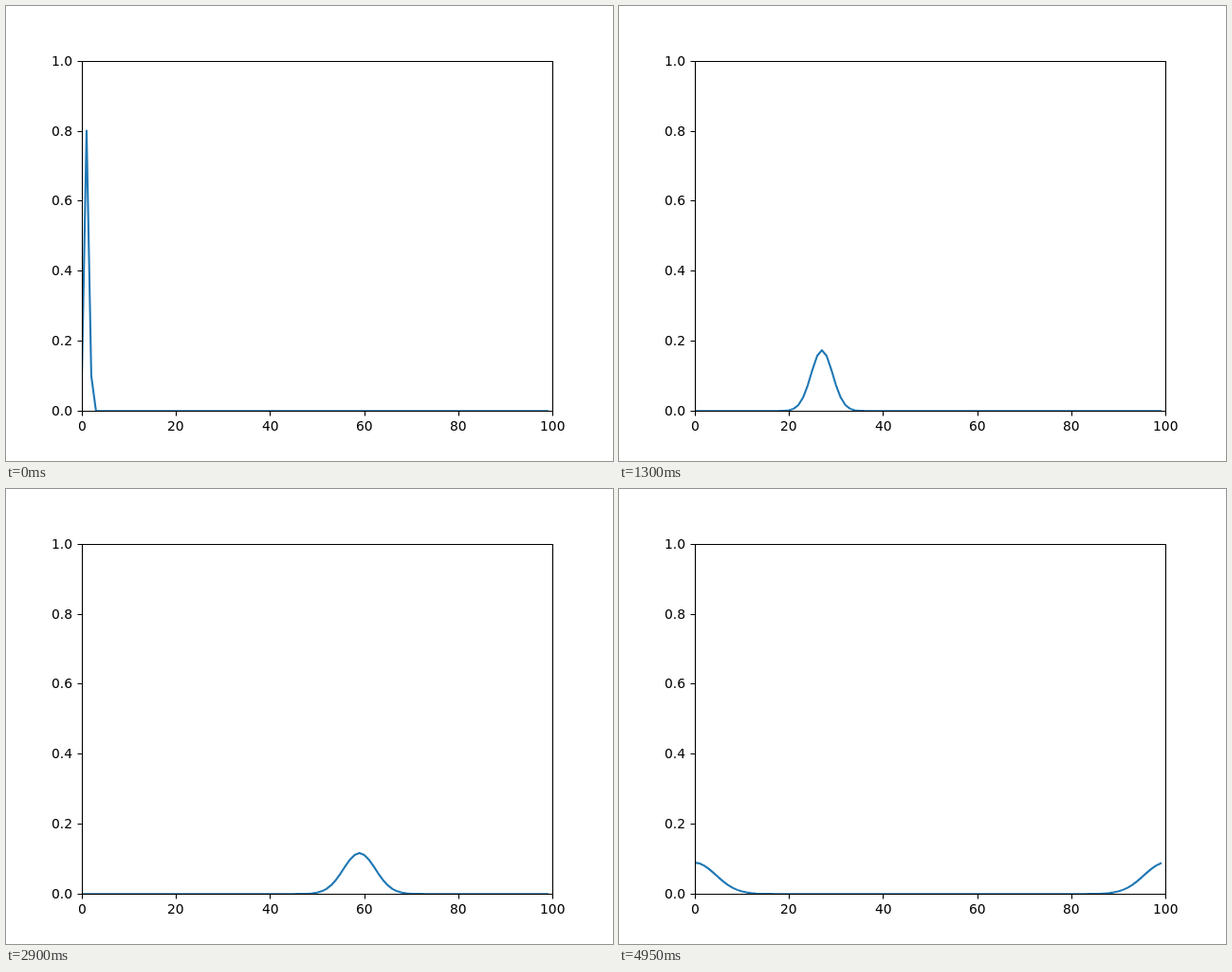
An HTML page for the animation above (5000 ms loop, 640 px wide and 480 px high).

```html
<!DOCTYPE html>
<html lang="en">
<head>
<meta charset="utf-8">
<title>Drifting pulse</title>
<style>
html, body { margin: 0; width: 100%; height: 100%; overflow: hidden; background: #fff; }
svg { display: block; width: 640px; height: 480px; }
text { font: 13.889px "DejaVu Sans", sans-serif; fill: #000; }
#curve { fill: none; stroke: #1f77b4; stroke-width: 2.083; stroke-linejoin: round; stroke-linecap: square; }
#axes { fill: none; stroke: #000; stroke-width: 1.111; }
</style>
</head>
<body>
<svg viewBox="0 0 640 480">
  <clipPath id="plot"><rect x="80" y="58" width="496" height="370"/></clipPath>
  <g clip-path="url(#plot)"><path id="curve"/></g>
  <path id="axes"/>
  <g id="labels"></g>
</svg>
<script>
const CELLS = 100, STEP = 50, LOOP = 5000;
const LEFT = 80, WIDTH = 496, BOTTOM = 427.2, HEIGHT = 369.6;
const curve = document.getElementById("curve");
const px = x => LEFT + WIDTH * x / 100;
const py = y => BOTTOM - HEIGHT * y;
const snap = v => Math.floor(v + 0.5) + 0.5;

function label(text, x, y) {
  const el = document.createElementNS("http://www.w3.org/2000/svg", "text");
  el.setAttribute("x", x);
  el.setAttribute("y", y);
  el.textContent = text;
  document.getElementById("labels").append(el);
}

function drawAxes() {
  let d = "M80.5 58.5H576.5V427.5H80.5Z";
  for (let i = 0; i <= 5; i++) {
    const x = px(20 * i), y = py(i / 5), name = String(20 * i);
    d += `M${snap(x)} 427.5v5M75.5 ${snap(y)}h5`;
    label(name, Math.round(x - name.length * 4.42), 448);
    label((i / 5).toFixed(1), 48, snap(y) + 4.5);
  }
  document.getElementById("axes").setAttribute("d", d);
}

// Move one cell right, with a 10% chance of falling short or overshooting.
function advance(p) {
  const at = i => p[(i + CELLS) % CELLS];
  return p.map((_, i) => 0.1 * at(i) + 0.8 * at(i - 1) + 0.1 * at(i - 2));
}

function toPath(p) {
  return "M" + p.map((v, i) => px(i).toFixed(2) + " " + py(v).toFixed(3)).join("L");
}

const paths = [];
let belief = Array.from({ length: CELLS }, (_, i) => i === 0 ? 1 : 0);
for (let n = 0; n < LOOP / STEP; n++) {
  belief = advance(belief);
  paths.push(toPath(belief));
}

let shown = -1;
function render(time) {
  const n = Math.floor((time % LOOP) / STEP);
  if (n !== shown) curve.setAttribute("d", paths[shown = n]);
}

function tick() {
  render(performance.now());
  requestAnimationFrame(tick);
}

drawAxes();
tick();
</script>
</body>
</html>
```
